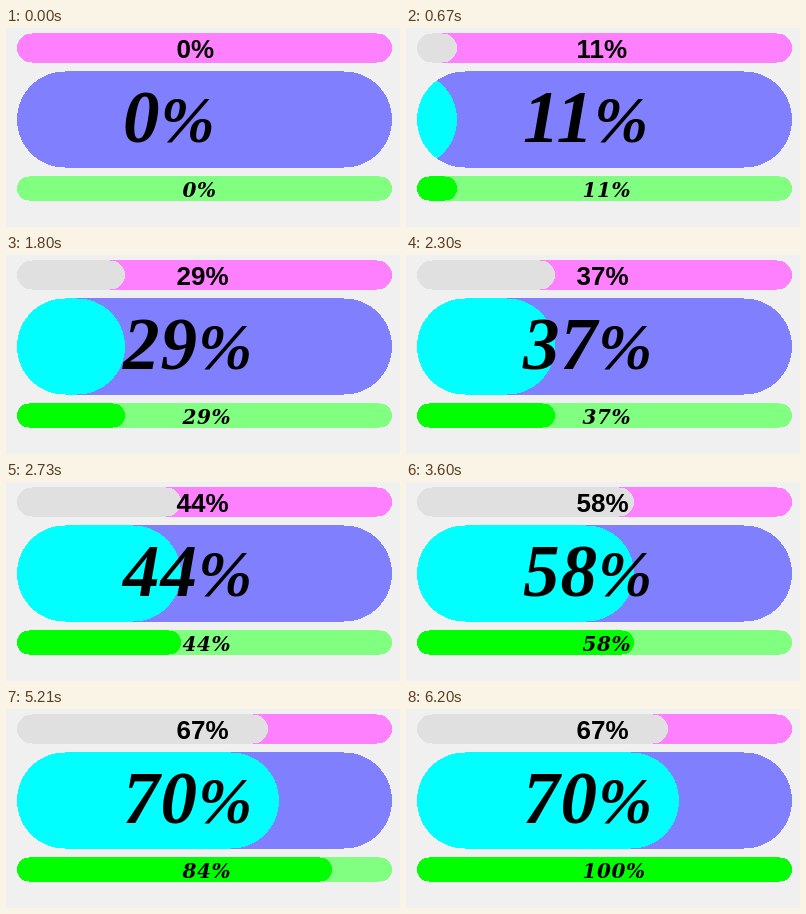
These frames come from a looping animation (394x199 px, 7050 ms). An HTML page with a canvas:

```html
<!DOCTYPE html>
<html lang="en">
<head>
<meta charset="utf-8">
<title>Rounded progress bars</title>
<style>
  html, body { margin: 0; width: 100%; height: 100%; overflow: hidden; background: #f0f0f0; }
  canvas, svg { position: absolute; left: 0; top: 0; width: 394px; height: 199px; }
  text { fill: #000; font-weight: 700; }
  #small { font-size: 26px; font-family: "Liberation Sans", Arial, sans-serif; }
  #large { font-size: 73px; font-style: italic; letter-spacing: 1px; font-family: "Liberation Serif", "Times New Roman", serif; }
  #large .unit { font-size: 65px; }
  #wide { font-size: 20px; font-style: italic; letter-spacing: 0.6px; font-family: "DejaVu Serif", serif; }
</style>
</head>
<body>
<canvas width="394" height="199"></canvas>
<svg viewBox="0 0 394 199">
  <text id="small" x="170.5" y="30"><tspan class="num">0</tspan><tspan class="unit">%</tspan></text>
  <text id="large" x="117" y="114"><tspan class="num">0</tspan><tspan class="unit">%</tspan></text>
  <text id="wide" x="176.5" y="169"><tspan class="num">0</tspan><tspan class="unit">%</tspan></text>
</svg>
<script>
  const LOOP = 7050, STEP = 62.2, LEFT = 11, WIDTH = 375;
  const ctx = document.querySelector('canvas').getContext('2d');
  const bars = [
    { id: 'small', y: 5, h: 30, max: 67, back: '#ff80ff', fill: '#e0e0e0' },
    { id: 'large', y: 43, h: 97, max: 70, back: '#8080ff', fill: '#00ffff' },
    { id: 'wide', y: 148, h: 25, max: 100, back: '#80ff80', fill: '#00ff00' }
  ];
  for (const bar of bars) bar.num = document.querySelector(`#${bar.id} .num`);

  // Hard-edged pill, painted row by row; the fill is the same pill cut by a shifted copy.
  function drawBar({ y, h, back, fill }, value) {
    const r = h / 2, right = LEFT + WIDTH;
    const end = Math.min(right, Math.floor(LEFT - 1 + (WIDTH + 2) * value / 100));
    for (let row = 0; row < h; row++) {
      const dy = row + 0.5 - r;
      const inset = Math.floor(r - Math.sqrt((r - 0.5) ** 2 - dy * dy));
      const x = LEFT + inset;
      ctx.fillStyle = back;
      ctx.fillRect(x, y + row, right - inset - x, 1);
      ctx.fillStyle = fill;
      ctx.fillRect(x, y + row, Math.max(0, end - inset - x), 1);
    }
  }

  function progress(t) {
    return t < 50 ? 0 : Math.min(100, 1 + Math.floor((t - 42) / STEP));
  }

  let shown = -1;
  function render(t) {
    const p = progress(t);
    if (p === shown) return;
    shown = p;
    ctx.clearRect(0, 0, 394, 199);
    for (const bar of bars) {
      const value = Math.min(p, bar.max);
      drawBar(bar, value);
      bar.num.textContent = value;
    }
  }

  const start = performance.now();
  function tick() {
    render((performance.now() - start) % LOOP);
    requestAnimationFrame(tick);
  }
  tick();
</script>
</body>
</html>
```
